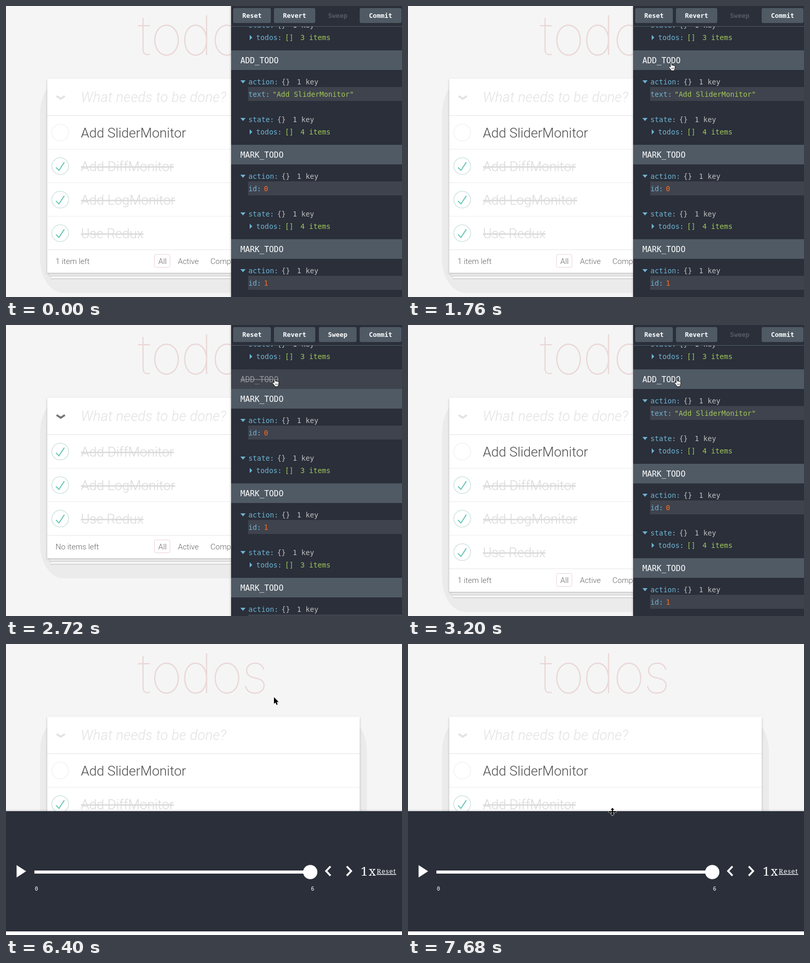
An HTML page for the animation above (8 s loop, 767 by 564 pixels).

```html
<!DOCTYPE html>
<html lang="en">
<head>
<meta charset="utf-8">
<title>Todo list with monitors</title>
<style>
html, body { margin: 0; width: 100%; height: 100%; overflow: hidden; background: #f5f5f5; }
svg { display: block; overflow: hidden; }
text { white-space: pre; }
.title { font: 100 106px Inter, sans-serif; fill: #af2f2f; fill-opacity: .15; text-anchor: middle; }
.todo { font: 300 26px Roboto, sans-serif; fill: #4d4d4d; }
.done { fill: #d9d9d9; text-decoration: line-through; }
.hint { font: italic 300 27px Roboto, sans-serif; letter-spacing: .27px; fill: #e2e2e2; }
.foot { font: 300 15px Roboto, sans-serif; fill: #666; }
.destroy { font: 300 33px Roboto, sans-serif; fill: #cc9a9a; text-anchor: middle; }
.mono { font: 13.8px "DejaVu Sans Mono", monospace; }
.head { font-size: 15.4px; }
.btn { font: bold 12.4px "DejaVu Sans Mono", monospace; text-anchor: middle; }
.small { font: 10.5px "DejaVu Sans Mono", monospace; fill: #fff; text-anchor: middle; }
.speed { font: 300 24px "Noto Serif", serif; letter-spacing: 2px; fill: #fff; }
.reset { font: 300 13px "Noto Serif", serif; letter-spacing: 1px; fill: #fff; text-decoration: underline; }
.card { fill: #fff; filter: drop-shadow(0 2px 2px rgba(0,0,0,.22)); }
.dock { filter: drop-shadow(0 0 2px rgba(0,0,0,.3)); }
</style>
</head>
<body>
<svg width="767" height="564" viewBox="0 0 767 564"><g id="scene"></g><g id="pointer"></g></svg>
<script>
const DARK = '#2a2f3a', MID = '#3f434d', SLATE = '#4f5a65', GREY = '#bebebe';
const BLUE = '#6fb3d2', GREEN = '#a1c659', ORANGE = '#fc6d24', WHITE = '#fff';
const CHAR = 8.3;

const rect = (x, y, w, h, fill, more = '') =>
  `<rect x="${x}" y="${y}" width="${w}" height="${h}" fill="${fill}" ${more}/>`;
const path = (d, more) => `<path d="${d}" ${more}/>`;
const text = (x, y, str, cls, fill) =>
  `<text x="${x}" y="${y}" class="${cls}"${fill ? ` style="fill:${fill}"` : ''}>${str}</text>`;
const move = (x, y, inner) => `<g transform="translate(${x} ${y})">${inner}</g>`;

// ---- Todo page ----
function checkbox(y, done) {
  const tick = path('M72 25L42 71 27 56l-4 4 20 20 34-52z', 'fill="#5dc2af"');
  return `<g transform="translate(105 ${y}) scale(.326) translate(-50 -50)">
    <circle cx="50" cy="50" r="50" fill="none" stroke="${done ? '#bddad5' : '#ededed'}" stroke-width="3.2"/>
    ${done ? tick : ''}</g>`;
}

function page(open, hovered) {
  const items = ['Add DiffMonitor', 'Add LogMonitor', 'Use Redux'].map(name => [name, true]);
  if (open) items.unshift(['Add SliderMonitor', false]);
  const footer = 212 + 65 * items.length, bottom = footer + 45;
  let out = rect(0, 0, 767, 564, '#f5f5f5');
  out += '<text class="title" x="268 311 369 428 482" y="95">todos</text>';
  out += rect(66, 142, 633, bottom + 39 - 142, '#ebebeb', 'rx="45" ry="66"');
  for (const [inset, drop] of [[6.6, 11], [3.3, 5.5]])
    out += rect(80 + inset, 300, 605 - 2 * inset, bottom + drop + 1.2 - 300, '#c6c6c6') +
           rect(80 + inset, 300, 605 - 2 * inset, bottom + drop - 300, '#f6f6f6');
  out += rect(80, 141, 605, bottom - 141, WHITE, 'class="card"');
  out += path('M98 174.5L106 179.8L114 174.5',
    `fill="none" stroke="${open ? '#e2e2e2' : '#737373'}" stroke-width="3.8"`);
  out += text(145, 186, 'What needs to be done?', 'hint');
  items.forEach(([name, done], i) => {
    const y = 212 + 65 * i;
    out += rect(80, y, 605, 1, i ? '#ededed' : '#e2e2e2');
    out += checkbox(y + 33.3, done) + text(145, y + 43, name, done ? 'todo done' : 'todo');
    if (hovered === i) out += text(652, y + 47, '×', 'destroy');
  });
  out += rect(80, footer, 605, 1, '#e6e6e6');
  out += rect(287.5, footer + 9.5, 30, 25, 'none', 'rx="3" stroke="#ebd2d2"');
  [[96, open ? '1 item left' : 'No items left'], [295, 'All'], [333, 'Active'], [396, 'Completed']]
    .forEach(([x, label]) => out += text(x, footer + 28, label, 'foot'));
  return out;
}

// ---- Log monitor ----
const downArrow = y => path(`M18 ${y - 3}h10l-5 6z`, `fill="${BLUE}"`);
const rightArrow = y => path(`M36 ${y - 5}v10l5-5z`, `fill="${BLUE}"`);

function node(x, y, key, braces, count, color) {
  const after = x + key.length * CHAR + 6;
  return text(x, y + 5, key, 'mono', BLUE) + text(after, y + 5, braces, 'mono', color) +
         text(after + 30, y + 5, count, 'mono', color);
}

function block(y, name, key, value, count, skipped) {
  const title = text(18, y + 25, name, 'mono head', skipped ? '#92959a' : WHITE);
  const head = rect(0, y, 800, 38, skipped ? MID : SLATE) + title;
  if (skipped) return head + rect(18, y + 19, 74, 1.2, '#92959a');
  return head + downArrow(y + 61) + node(33.5, y + 61, 'action:', '{}', '1 key', GREY) +
    rect(33, y + 71, 800, 27, MID) +
    text(33.5, y + 90, key, 'mono', BLUE) +
    text(33.5 + key.length * CHAR + 5, y + 90, value, 'mono', key === 'id:' ? ORANGE : GREEN) +
    downArrow(y + 134) + node(33.5, y + 134, 'state:', '{}', '1 key', GREY) +
    rightArrow(y + 158) + node(48.5, y + 158, 'todos:', '[]', count + ' items', GREEN);
}

function logMonitor(x, y, spans, skipped) {
  const count = skipped ? 3 : 4, next = skipped ? 124 : 269;
  let out = block(-97, 'ADD_TODO', 'text:', '"Add LogMonitor"', 3);
  out += block(86, 'ADD_TODO', 'text:', '"Add SliderMonitor"', 4, skipped);
  for (let id = 0; id < 3; id++)
    out += block(next + 183 * id, 'MARK_TODO', 'id:', id, count);
  out += rect(0, 0, 800, 39, DARK) + rect(0, 39, 800, 1, SLATE);
  ['Reset', 'Revert', 'Sweep', 'Commit'].forEach((label, i) => {
    const [left, right] = spans[i], off = label === 'Sweep' && !skipped;
    if (!off) out += rect(left, 4, right - left, 29, SLATE, 'rx="3"');
    out += text((left + right) / 2, 23, label, 'btn', off ? '#555b66' : WHITE);
  });
  return rect(x, y && y - 1.5, 800, 600, DARK, 'class="dock"') +
    `<svg x="${x}" y="${y}" width="800" height="600">${out}</svg>`;
}

// ---- Slider monitor ----
function sliderMonitor() {
  const line = `fill="none" stroke="${WHITE}" stroke-width="3.6"`;
  return rect(-5, 324, 777, 233, DARK, 'class="dock"') + rect(0, 557, 767, 7, WHITE) +
    path('M20.5 428.5v24l18.5-12z', `fill="${WHITE}"`) +
    rect(55, 439, 530, 6, WHITE) + `<circle cx="589.3" cy="442" r="13.8" fill="${WHITE}"/>` +
    path('M628.5 431l-8.5 9 8.5 9', line) + path('M660 431l8.5 9-8.5 9', line) +
    text(59, 478, '0', 'small') + text(594, 478, '6', 'small') +
    text(687, 449, '1x', 'speed') + text(718, 445, 'Reset', 'reset');
}

// ---- Pointers ----
const outlined = 'fill="#000" stroke="#fff" stroke-width="1.2" stroke-linejoin="round" paint-order="stroke"';
const pointers = {
  arrow: path('M1 1v13l2.9-2.7 2.1 4.7 2.2-.9-2-4.5h4z', outlined),
  hand: path('M4.2 9.3V2a1.3 1.3 0 0 1 2.6 0v4.2a1.2 1.2 0 0 1 2.3.3 1.2 1.2 0 0 1 2.2.5 1.1 1.1 0 0 1 2 .8V11' +
    'c0 2-1.3 2.8-1.5 5.3H5.6C5.4 14 3 12.2 1.2 9.8.4 8.5 1.8 7.4 2.8 8.3z',
    'fill="#fff" stroke="#111" stroke-width="1"') + path('M7 10.5v3M9 10.5v3M11 10.5v3', 'stroke="#333" stroke-width=".8"'),
  resize: path('M0-7.5l3.5 4H1v2.5h6.5v2H1v2.5h2.5L0 7.5l-3.5-4H-1V1h-6.5v-2H-1v-2.5h-2.5z', outlined)
};

// ---- Timeline ----
const side = [[4, 77], [83, 163], [170, 243], [249, 330]];
const wide = [[2, 187], [193, 384], [391, 574], [580, 771]];
const scenes = [
  [0, () => page(true) + logMonitor(436, 0, side, false)],
  [2080, () => page(false) + logMonitor(436, 0, side, true)],
  [3200, () => page(true) + logMonitor(436, 0, side, false)],
  [4960, () => page(true) + logMonitor(-5, 325.5, wide, false)],
  [6400, () => page(true) + sliderMonitor()],
  [6880, () => page(true, 0) + sliderMonitor()],
  [7040, () => page(true, 1) + sliderMonitor()],
  [7200, () => page(true) + sliderMonitor()]
];
const moves = [
  [0],
  [320, 'arrow', 488, 327], [480, 'arrow', 500, 214], [640, 'arrow', 504, 144], [800, 'arrow', 508, 140],
  [960, 'hand', 506, 100], [1120, 'hand', 506, 84], [1440, 'hand', 503, 92], [1600, 'hand', 503, 107],
  [1760, 'hand', 504, 109], [2400, 'hand', 507, 109], [2560, 'hand', 510, 107], [2720, 'hand', 515, 103],
  [4960, 'arrow', 518, 102], [6720, 'arrow', 495, 135], [6880, 'arrow', 419, 223], [7040, 'arrow', 399, 310],
  [7200, 'resize', 398, 321], [7360, 'arrow', 398, 333], [7520, 'arrow', 395, 328], [7680, 'resize', 396, 325]
];
const sceneLayer = document.getElementById('scene'), pointerLayer = document.getElementById('pointer');
const current = (list, t) => list.findLast(([start]) => start <= t);
let shownScene, shownMove;

function draw() {
  const t = performance.now() % 8000;
  const scene = current(scenes, t), step = current(moves, t);
  if (scene !== shownScene) sceneLayer.innerHTML = (shownScene = scene)[1]();
  if (step !== shownMove) {
    shownMove = step;
    const [, kind, x, y] = step;
    pointerLayer.innerHTML = kind ? move(x, y, pointers[kind]) : '';
  }
  requestAnimationFrame(draw);
}
draw();
</script>
</body>
</html>
```
